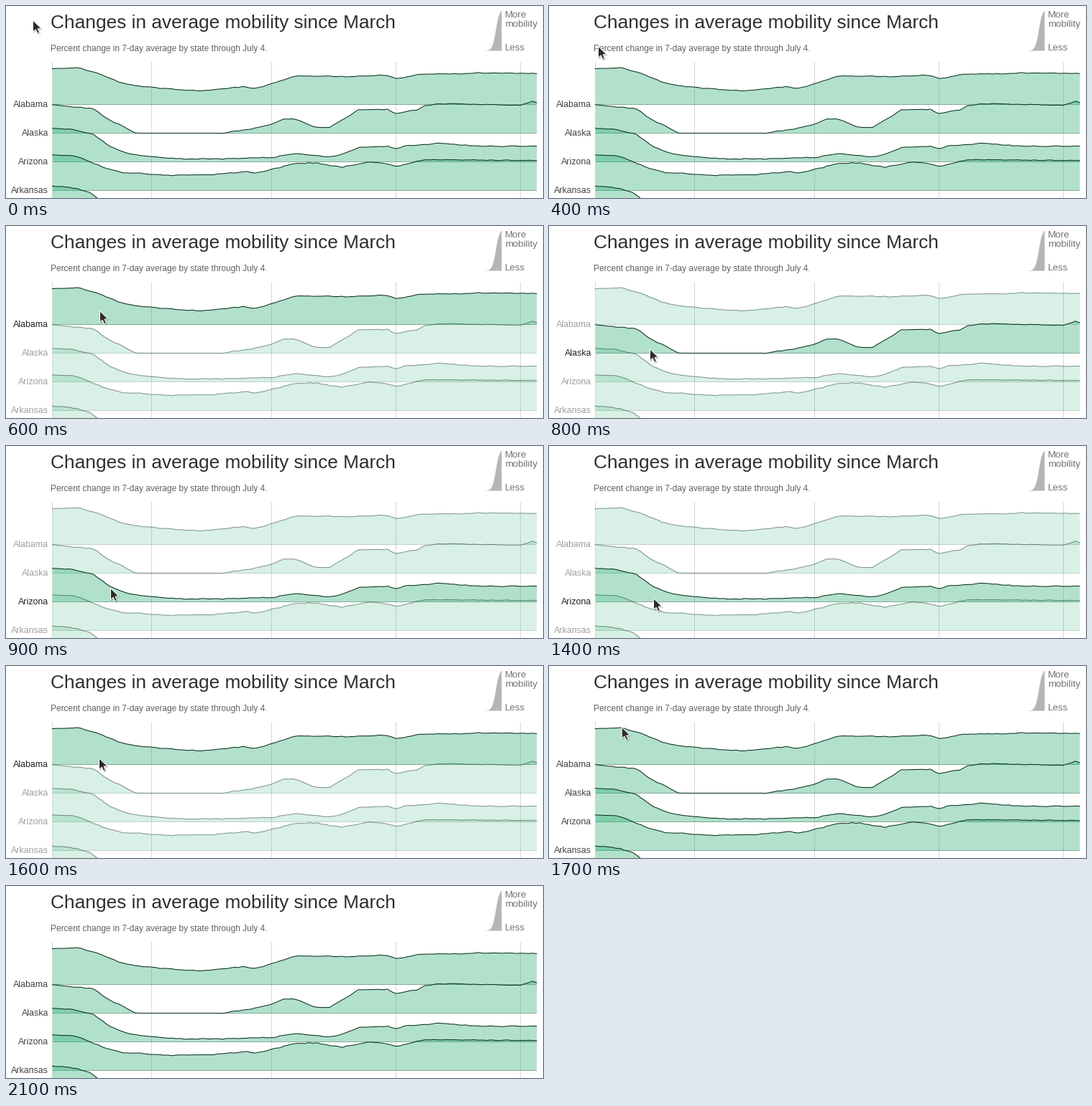
These frames come from a looping animation (747x268 px, 2.4 s). A matplotlib script:

```python
import numpy as np
import matplotlib.pyplot as plt
from matplotlib.animation import FuncAnimation
from matplotlib.patches import Polygon

W, H, DPI = 747, 268, 100
FRAMES, STEP = 24, 100
LEFT, RIGHT, TOP = 64.5, 738, 78
FIRST, ROW = 137.5, 40
GREEN = (44 / 255, 174 / 255, 114 / 255)
INK = "#0a3425"

# Turning points of each ridge: x on the stage, height above its base line.
STATES = {
    "Alabama": [(64, 50), (99, 51.5), (129, 43), (158, 31), (187, 25.5),
                (246, 20.5), (272, 19), (330, 25), (346, 22), (364, 27.5),
                (404, 40), (482, 39), (528, 41), (543, 36), (575, 42),
                (661, 44), (738, 43.5)],
    "Alaska": [(64, 39.5), (105, 36), (122, 34), (140, 20), (157, 12),
               (180, 0), (300, 0), (346, 7), (369, 12.5), (387, 20.5),
               (404, 19), (430, 8), (450, 8), (473, 22), (490, 32.5),
               (531, 33), (542, 27), (571, 32.5), (580, 38), (606, 41.5),
               (715, 39), (732, 44), (738, 43)],
    "Arizona": [(64, 46.5), (88, 46), (122, 38), (140, 25), (157, 15.5),
                (180, 9.5), (214, 6), (249, 4), (283, 4), (369, 6),
                (404, 11.5), (444, 7), (462, 8.5), (490, 20), (531, 22),
                (542, 18), (554, 22), (606, 26), (658, 21.5), (738, 22)],
    "Arkansas": [(64, 49.5), (94, 48.5), (122, 38), (145, 29), (163, 25),
                 (232, 21), (290, 22.5), (335, 26.5), (346, 24), (404, 38),
                 (433, 38), (467, 32.5), (505, 40), (528, 38), (542, 33.5),
                 (575, 41.5), (588, 43), (738, 42)],
    "": [(64, 46), (88, 45), (117, 37), (128, 28), (145, 16), (738, 12)],
}

# Pointer stops: step, x, y of the tip; it glides evenly between them.
STOPS = np.array([
    (0, 37.5, 20), (2, 37.5, 25), (3, 37.5, 25), (6, 130.5, 118.5),
    (9, 145.5, 198.5), (10, 145.5, 198.5), (12, 145.5, 239), (13, 145.5, 239),
    (14, 145.5, 212.5), (16, 129.5, 128.5), (18, 73, 42), (19, 73, 42),
    (20, 68, 14)])
ARROW = np.array([(0, 0), (0, 16), (3.7, 12.7), (6.3, 18.4), (9, 17.2),
                  (6.6, 11.6), (11.6, 11.4)])

fig = plt.figure(figsize=(W / DPI, H / DPI), dpi=DPI, facecolor="white")
ax = fig.add_axes([0, 0, 1, 1])
ax.set_xlim(0, W)
ax.set_ylim(H, 0)
ax.axis("off")
rng = np.random.default_rng(7)


def pt(px):
    return px * 72 / DPI


def label(x, y, text, size, color, ha="left"):
    return ax.text(x, y, text, fontsize=pt(size), family="Liberation Sans",
                   color=color, ha=ha, va="baseline", zorder=8)


def rule(x, y, color, z):
    line, = ax.plot(x, y, color=color, lw=pt(1), zorder=z, snap=False,
                    solid_capstyle="butt")
    return line


class Ridge:
    def __init__(self, i, name, turns):
        base = FIRST + ROW * i
        x = np.linspace(LEFT, RIGHT, 118)
        tx, height = np.transpose(turns)
        h = np.interp(x, tx + 0.5, height)
        h += rng.normal(0, 0.35, x.size) * (h > 0)
        z = 2 + i
        self.fill = ax.fill_between(x, base - h, base, color=GREEN, lw=0,
                                    zorder=z, snap=False)
        self.base = rule([LEFT, RIGHT], [base, base], "black", z)
        self.line, = ax.plot(x, base - h, color=INK, lw=pt(1.1),
                             zorder=z + 0.5, snap=False)
        self.name = label(59.3, base + 3.4, name, 12.4, "#444444", "right")

    def show(self, mode):
        k = 0.5 if mode == "dim" else 1
        self.fill.set_alpha(0.37 * k)
        self.base.set_alpha(0.24 * k)
        self.line.set_alpha(k)
        self.name.set_color({"dim": "#a0a0a0", "on": "#222222",
                             "plain": "#444444"}[mode])


label(61.8, 31.5, "Changes in average mobility since March", 26.25, "#2e2e2e")
label(61.5, 63, "Percent change in 7-day average by state through July 4.",
      11.95, "#606060")
for y, word in ((16.5, "More"), (29, "mobility"), (62.3, "Less")):
    label(694, y, word, 13.4, "#747474")

# Legend wedge: a logistic rise up to its right edge.
wx = np.linspace(661, 689, 40)
rise = 1 / (1 + np.exp((681 - wx) / 2.5))
ax.fill_between(wx, 62 - 56 * rise / rise[-1], 62, color="#b5b5b5", lw=0)

for x in (64.5, 202.5, 369.5, 542.5, 715.5):
    rule([x, x], [TOP, H], "#d6d6d6", 1)

ridges = [Ridge(i, *state) for i, state in enumerate(STATES.items())]

shadow = ax.add_patch(Polygon(ARROW, fc="black", ec="black", lw=pt(1.5),
                              alpha=0.18, zorder=9))
arrow = ax.add_patch(Polygon(ARROW, fc="#2b2b2b", ec="white", lw=pt(1),
                             zorder=10))


def hovered(x, y):
    if x < LEFT or y < TOP + 8:
        return None
    return max(0, int(np.ceil((y - FIRST) / ROW)))


def update(i):
    tip = np.array([np.interp(i, STOPS[:, 0], STOPS[:, k]) for k in (1, 2)])
    visible = i <= STOPS[-1, 0]
    for part, shift in ((arrow, (0, 0)), (shadow, (0.8, 1))):
        part.set_xy(ARROW + tip + shift)
        part.set_visible(visible)
    active = hovered(*tip) if visible else None
    for k, ridge in enumerate(ridges):
        ridge.show("plain" if active is None else
                   "on" if k == active else "dim")
    return []


anim = FuncAnimation(fig, update, frames=FRAMES, interval=STEP,
                     init_func=lambda: update(0), repeat=True, repeat_delay=0)
plt.show()
```
